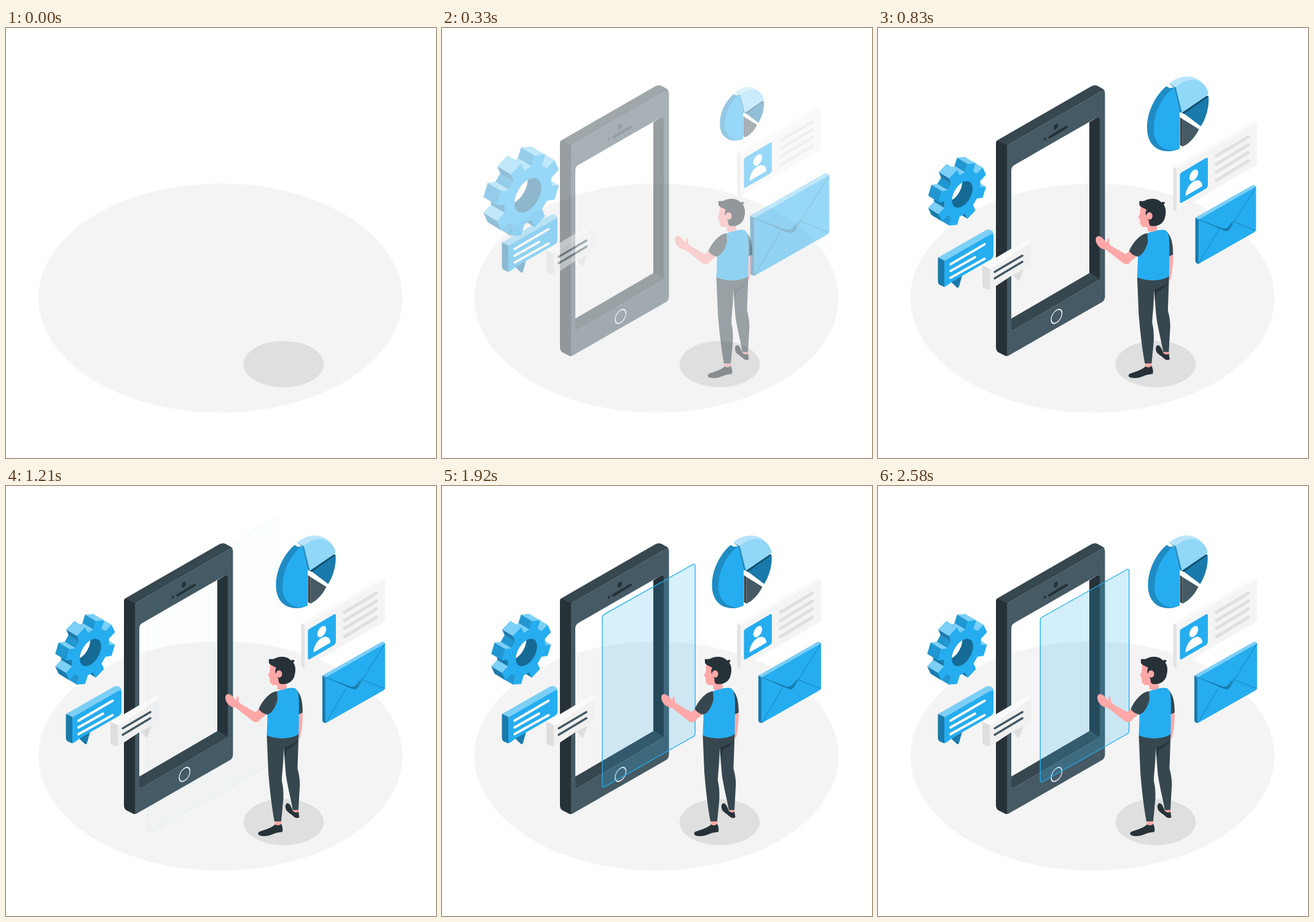
An HTML page for the animation above (2.62 s loop, 700 px wide and 700 px high).

```html
<!DOCTYPE html>
<html lang="en">
<head>
<meta charset="utf-8">
<title>Mobile interface</title>
<style>
  html, body { margin: 0; width: 100%; height: 100%; overflow: hidden; background: #fff; }
  svg { display: block; width: 100%; height: 100%; }
  .blue { fill: #25adf0; }
  .sky { fill: #7ccff6; }
  .deep { fill: #1a7aab; }
  .ink { fill: #263238; }
  .slate { fill: #37474f; }
  .steel { fill: #455a64; }
  .skin { fill: #ffa8a7; }
  .white { fill: #fff; }
  .line { fill: none; stroke-linecap: round; stroke-linejoin: round; }
</style>
</head>
<body>
<svg viewBox="0 0 700 700">
  <ellipse cx="349" cy="439.5" rx="296.2" ry="186.5" fill="#f4f4f4"/>
  <ellipse cx="452" cy="547.2" rx="65.3" ry="37.7" fill="#dfdfdf"/>

  <g id="gear"></g>

  <g id="phone">
    <path class="steel" fill-rule="evenodd" d="M210 196Q210 192 214 189L362 104Q369 100 369.5 106V438Q369 443 365 446L213 533Q210 535 207 533Z
      M217 232V489Q217 494 222 491L357 412Q361 410 361 405V148Q361 143 356 146L222 223Q217 226 217 232Z"/>
    <path class="slate" d="M194 183L347 95Q352 92 357 94L366 99Q369 101 369.5 104Q367 101 362 104L214 189Q211 191 210 194Z"/>
    <path class="ink" d="M194 183L211 191.5Q210 193 210 196V534Q207 534 204 532L196 528Q192 525 192 520V188Q192 184 194 183Z"/>
    <path class="ink" d="M344 153.500L356 146Q361 143 361 148V409L344 399Z"/>
    <path class="slate" d="M217 473L344 399L361 408.500Q360 410 357 412L222 491Q217 494 217 489Z"/>
    <path class="line" d="M279 178L307 161" stroke="#263238" stroke-width="4.200"/>
    <g class="ink">
      <circle r="4.300" transform="matrix(.866 -.5 0 1 289.500 160.500)"/>
      <circle r="2.300" transform="matrix(.866 -.5 0 1 271.700 181)"/>
    </g>
    <circle class="line" r="10.200" transform="matrix(.866 -.5 0 1 290.700 469.500)" stroke="#eee" stroke-width="1.700"/>
  </g>

  <g id="pie">
    <path fill="#1f8cc4" d="M470 96C453 110 439.500 136 439.500 161C439.500 182 449 193 461 197C471 200.500 483 199 491 194.500L482 98L475 99Z"/>
    <path class="blue" d="M482 98L491 137V194.500C473 203 450 192 450 164C450 138 463 112 482 98Z"/>
    <path fill="#b8e4fb" d="M474 92C487 81 502 78 514 82.500C526 87 534 97 536.500 108.500L495 138L485 98Z"/>
    <path fill="#1f8cc4" d="M474 92L485 98L495 138L491 137L482 98Z"/>
    <path fill="#90d7f8" d="M485 97.500C497 87 510 84 520 87.500C529 91 535 99 536.500 108.500L495 138Z"/>
    <path class="deep" d="M498 139.500L536.500 112C538 128 533 146 524.500 159.500Z"/>
    <path fill="#0f5276" d="M494.500 138L534 111L536.500 112.500L498 140Z"/>
    <path class="steel" d="M495.500 148L521.500 164C516 176 506 187 495.500 191.500Z"/>
    <path class="slate" d="M491.500 145L495.500 148V191.500L491.500 189Z"/>
  </g>

  <g id="card">
    <path fill="#fafafa" d="M481 223L610 150Q613 148 617 153L487 228Z"/>
    <path fill="#f4f4f4" d="M486 227L613 153.500Q617 152 617 155V217Q617 220 614 222L486 296Z"/>
    <path fill="#e3e3e3" d="M480.500 223.500L486 227V296.500L482.500 295Q480.500 294 480.500 291Z"/>
    <path class="blue" d="M491.500 237Q491.500 234 495 232L533 209.500Q537 207 537 211V253Q537 257 533 259.500L495 281.500Q491.500 284 491.500 280Z"/>
    <circle class="white" r="8.300" transform="matrix(.866 -.5 0 1 514 237)"/>
    <path class="white" d="M500.500 271C501 260 507 251 514 247C522 243 528 247 528 255Z"/>
    <path class="line" d="M551 205.500L603 174.500M551 219L603 187.500M551 232L603 200M551 245.500L603 213.500" stroke="#e0e0e0" stroke-width="5"/>
  </g>

  <g id="mail">
    <path class="sky" d="M515 308.500L611 254Q614 252 617 256L520.500 312Z"/>
    <path class="blue" d="M520.500 311.500L617 256V328Q617 331 614 333L520.500 386Z"/>
    <path class="deep" d="M515 308.500L520.500 311.500V386L517 385Q515 384 515 381Z"/>
    <path class="deep" d="M521 311.500L560 326Q567 328 571 323L579 313L573 327Q570 332 564 330Z"/>
    <path class="line" d="M521 311.500L564 330Q570 332 573 327L616.500 257M555 327L521 385M580 315.500L616.500 330" stroke="#1a7aab" stroke-width=".9"/>
  </g>

  <g id="chats">
    <path class="deep" d="M119 411L128 419.500Q130.500 422 132 418L137 400Z"/>
    <path class="sky" d="M98 371L175 327Q180 324 185 327Q188 329 188 333L108 378Z"/>
    <path class="blue" d="M108 380Q108 377 111 375L184 333Q188 331 188 335V367Q188 371 184 374L137 401L120 411L112 417Q108 420 106 418Z"/>
    <path class="deep" d="M98 371L109 376.500Q108 378 108 380V419L101 416Q97.500 414 97.500 410V374Q97.500 372 98 371Z"/>
    <path class="line" d="M118 382L173.500 349.500M118 393L158 370.500M118 404L173.500 373" stroke="#fff" stroke-width="3.800"/>
    <path fill="#dedede" d="M219 400L227 408Q229.500 411 231 407L237 390Z"/>
    <path fill="#fafafa" d="M171 384L240 343Q244 340 247 343Q249 345 249 348L182 392Z"/>
    <path fill="#f0f0f0" d="M182 394Q182 391 185 389L245 349Q249 346 249 351V376Q249 380 245 383L220 399L186 421.500Q184 423 181 423Z"/>
    <path fill="#dedede" d="M171 384L183 390Q182 392 182 394V423Q179 424 175 422Q170 420 170 416V387Q170 385 171 384Z"/>
    <path class="line" d="M190 394.500L235 368M190 405L235 378" stroke="#455a64" stroke-width="3.500"/>
  </g>

  <path id="glass" d="M264.200 219Q264.200 215 268 213L405 136Q408.700 134 408.700 138V398Q408.700 402 405 404L268 481.500Q264.200 484 264.200 479Z"
    fill="#25adf0" fill-opacity=".2" stroke="#25adf0" stroke-width="1.400"/>

  <g id="man">
    <path class="skin" d="M477 371L483 370C483 385 481 402 478 412L475 404Z"/>
    <path class="slate" d="M424.500 405C440 413 465 412 476.500 403L474.500 460C478 472 479 484 478 492L476 528H467C462 500 456 480 455 462L452 426C452 450 449 470 449 480C452 492 452 505 451 515L448 546H437C432 520 429 490 427 465Z"/>
    <path class="ink" d="M453 426Q466 422 476 414Q466 426 457 429L455 442Z"/>
    <path class="skin" d="M437.500 546H448V551Q443 555 437.500 552ZM467 527.500H476.500V531Q472 534 467.500 531Z"/>
    <path class="ink" d="M438 551C434 556 420 560 412 563C408 567 412 570 420 570C430 570 434 566 441 564.500L450 563C451 558 450 554 448 550C445 553 441 553 438 551Z"/>
    <path class="ink" d="M457 517C461 515 464 521 467 529C470 532 474 532 476 530L477.500 539C474 542 470 540 467 537C463 533 458 531 456 527C454 522 455 518 457 517Z"/>
    <path class="skin" d="M414 361L406 368C394 362 384 356 379 352L378.500 343C377 341 375 343 375 349C371 346 368 340 363 339C358 338 356 343 357.500 348C360 356 366 360 374 361L402 383C408 386 412 384 415 379L424 372Z"/>
    <path class="slate" d="M470 330C480 336 483 350 483 369L476 372L473 345Z"/>
    <path class="blue" d="M440 335C446 331 465 327 470 329C476 332 477 342 477 355L476.500 404C466 412 440 413 424.500 406L426 366C426 350 432 340 440 335Z"/>
    <path class="slate" d="M441 334C428 336 417 350 411.500 363Q416 370 425 372C433 371 441 356 442 346Z"/>
    <path class="skin" d="M430 290L429 303L426 309L429 311C429 318 430 323 435 324L441 324L442 331C448 333 455 331 457 328L456 316L450 290Z"/>
    <path class="ink" d="M428 284C427 280 431 283 437 281C445 276 459 277 464 284C467 282 469 283 470 285L467.500 287C472 293 472 302 469 311C465 320 457 324 446 322C442 318 445 313 442 312L440 306C436 302 440 296 440 296C436 293 430 292 428 288Z"/>
    <ellipse class="skin" cx="444.500" cy="306" rx="5" ry="6"/>
  </g>
</svg>

<script>
const $ = id => document.getElementById(id);

// Isometric gear: flat outline, extruded back along `depth`.
function buildGear() {
  const depth = [-17.5, -10.5], teeth = 8, pts = [];
  const iso = (r, deg) => {
    const a = deg * Math.PI / 180, u = r * Math.cos(a), v = r * Math.sin(a);
    return [137.5 + .866 * u, 271 - .5 * u + v];
  };
  for (let i = 0; i < teeth; i++) {
    const mid = 22.5 + i * 360 / teeth;
    pts.push(iso(35, mid - 14), iso(47, mid - 10), iso(47, mid + 10), iso(35, mid + 14));
  }
  const back = ([x, y]) => [x + depth[0], y + depth[1]];
  const poly = (list, fill) => `<path d="M${list.map(p => p.map(n => n.toFixed(1))).join('L')}Z" fill="${fill}" stroke="${fill}" stroke-width=".3"/>`;
  const walls = [];
  pts.forEach((p, i) => {
    const q = pts[(i + 1) % pts.length];
    const nx = q[1] - p[1], ny = p[0] - q[0];
    if (nx * depth[0] + ny * depth[1] <= 0) return;
    const up = -ny / Math.hypot(nx, ny);
    const fill = up > .6 ? '#7ccff6' : up > .1 ? '#2196d1' : '#1a7aab';
    const key = (p[0] + q[0]) * depth[0] + (p[1] + q[1]) * depth[1];
    walls.push({ key, svg: poly([p, q, back(q), back(p)], fill) });
  });
  walls.sort((a, b) => a.key - b.key);
  const hole = (x, y, extra) => `<circle r="20" transform="matrix(.866 -.5 0 1 ${x} ${y})" ${extra}/>`;
  $('gear').innerHTML = `<clipPath id="bore">${hole(137.5, 271, '')}</clipPath>` +
    walls.map(w => w.svg).join('') + poly(pts, '#25adf0') +
    hole(137.5, 271, 'fill="#166a96"') +
    `<g clip-path="url(#bore)">${hole(120, 260.5, 'fill="#fff"')}</g>`;
}

// cubic-bezier(.36, -.01, .5, 1.38)
function ease(x) {
  if (x <= 0) return 0;
  if (x >= 1) return 1;
  const curve = (s, a, b) => 3 * (1 - s) ** 2 * s * a + 3 * (1 - s) * s * s * b + s ** 3;
  let lo = 0, hi = 1;
  for (let i = 0; i < 24; i++) {
    const mid = (lo + hi) / 2;
    if (curve(mid, .36, .5) < x) lo = mid; else hi = mid;
  }
  return curve(lo, -.01, 1.38);
}

const zoom = (cx, cy, from) => left => {
  const s = 1 + (from - 1) * left;
  return `translate(${cx} ${cy}) scale(${s}) translate(${-cx} ${-cy})`;
};
const slide = (dx, dy) => left => `translate(${dx * left} ${dy * left})`;

const LOOP = 2620, FPS = 24;
const intro = { start: -38, span: 1000 }, late = { start: 1020, span: 1500 };
const parts = [
  ['phone', intro, slide(0, 0)],
  ['gear', intro, zoom(128.5, 266, 1.5)],
  ['pie', intro, zoom(488.3, 139.5, .5)],
  ['mail', intro, zoom(566, 319.5, 1.5)],
  ['card', intro, slide(0, -42)],
  ['chats', intro, slide(0, -42)],
  ['man', intro, slide(42, 0)],
  ['glass', late, zoom(336.5, 309, 1.5)],
].map(([id, time, move]) => ({ el: $(id), time, move }));

function draw(ms) {
  const step = Math.floor((ms + 4) * FPS / 1000);
  const t = step < 2 ? -100 : step * 1000 / FPS;
  for (const { el, time, move } of parts) {
    const p = ease((t - time.start) / time.span);
    el.setAttribute('opacity', Math.max(0, Math.min(1, p)));
    el.setAttribute('transform', move(1 - p));
  }
}

buildGear();
const begin = performance.now();
function tick() {
  draw((performance.now() - begin) % LOOP);
  requestAnimationFrame(tick);
}
tick();
</script>
</body>
</html>
```
